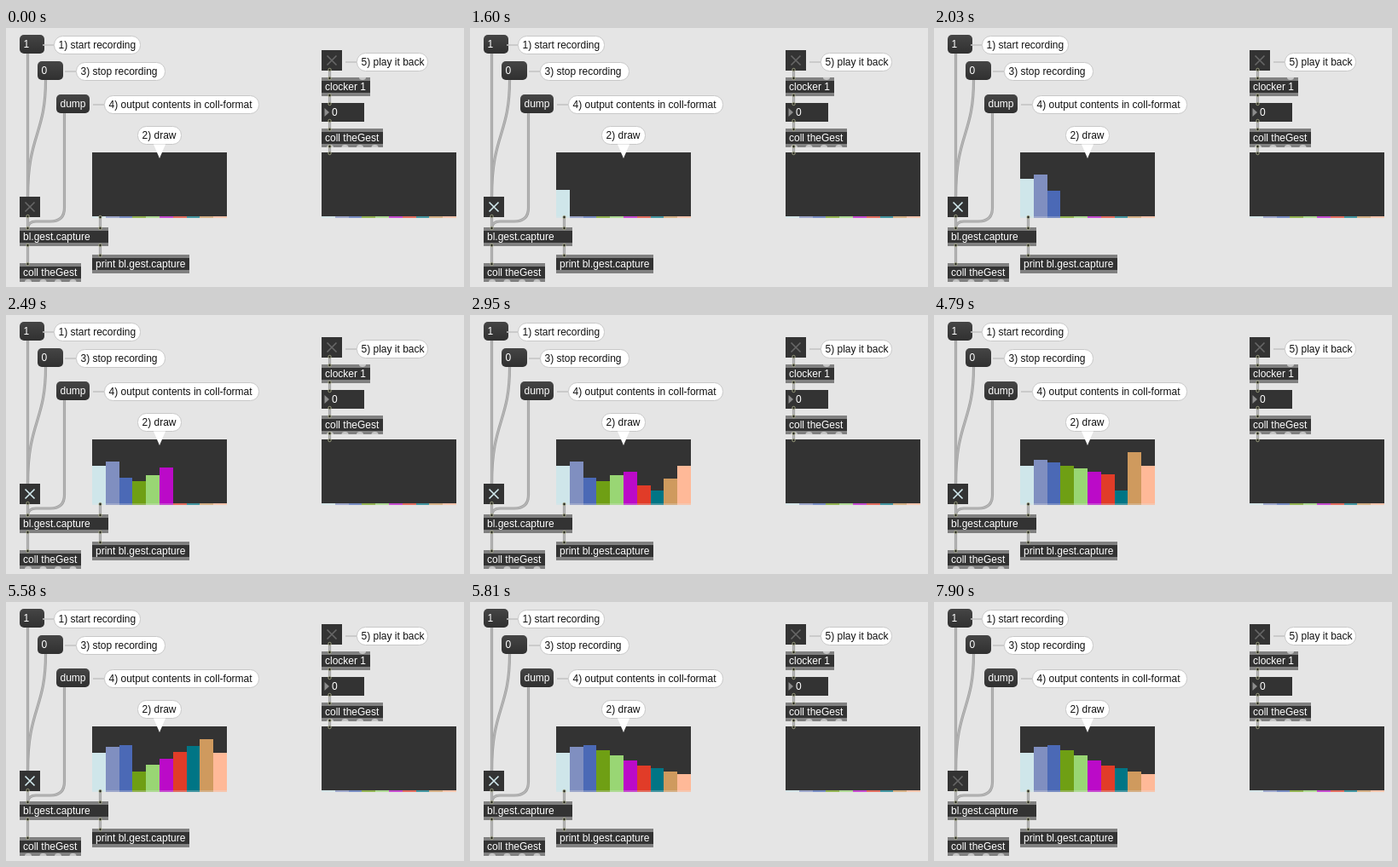
Recreate the animation shown at these times as an HTML page. Size 537x304 px, loop 8 s.

```html
<!DOCTYPE html>
<html lang="en">
<head>
<meta charset="utf-8">
<title>Gesture capture patch</title>
<style>
  html, body { margin: 0; width: 100%; height: 100%; overflow: hidden; background: #e5e5e5; }
  svg { display: block; width: 537px; height: 304px; }
  text { font: 12px Arial, "Liberation Sans", sans-serif; white-space: pre; }
</style>
</head>
<body>
<svg id="stage" viewBox="0 0 537 304" xmlns="http://www.w3.org/2000/svg">
  <defs>
    <linearGradient id="button" x2="0" y2="1">
      <stop stop-color="#454545"/><stop offset="1" stop-color="#303030"/>
    </linearGradient>
  </defs>
</svg>
<script>
const LOOP = 8000;
const DARK = '#333', LIGHT = '#fff', NOTCH = '#c6c6c6';
const FLOOR = 221, BAR_WIDTH = 15.8;
const barColors = ['#cfe6ea', '#808fc0', '#4b69b6', '#6f9f14', '#99d674',
  '#bb0ac8', '#e13c28', '#007585', '#cf9a5e', '#ffb998'];
const stage = document.getElementById('stage');

function add(tag, attrs, content) {
  const node = document.createElementNS('http://www.w3.org/2000/svg', tag);
  for (const key in attrs) node.setAttribute(key, attrs[key]);
  if (content !== undefined) node.textContent = content;
  return stage.appendChild(node);
}

const rect = (x, y, width, height, fill, rx = 0) => add('rect', { x, y, width, height, fill, rx });
const label = (x, y, content, fill = LIGHT) => add('text', { x, y, fill }, content);

function cord(d) {
  add('path', { d, fill: 'none', stroke: '#a0a0a0', 'stroke-width': 3.2 });
  add('path', { d, fill: 'none', stroke: '#b6b6b6', 'stroke-width': 1.6 });
}

const ports = [];
function wire(x, top, bottom) {
  cord(`M${x} ${top}V${bottom}`);
  ports.push([x, top - 1], [x, bottom + 1]);
}

function button(x, y, width, content) {
  rect(x, y, width, 22, 'url(#button)', 5);
  return label(x + 4.5, y + 15, content);
}

function bubble(x, y, width, content) {
  add('rect', { x: x + .5, y: y + .5, width: width - 1, height: 21, rx: 10, fill: '#fff', stroke: '#c8c8c8' });
  label(x + 5.5, y + 15, content, '#111');
}

function sideComment(x, y, width, content) {
  add('path', { d: `M${x - 13} ${y + 11}H${x}`, stroke: '#c4c4c4', 'stroke-width': 1.6 });
  bubble(x, y, width, content);
}

function object(x, y, width, content, outlets = 0) {
  rect(x, y, width, 22, '#808080');
  rect(x, y + 4, width, 14, DARK);
  label(x + 4, y + 15, content);
  for (let i = 0; i < outlets; i++) {
    add('path', { d: `M${x + 6 + i * 17.5} ${y + 22}a4 3 0 0 1 8 0z`, fill: NOTCH });
  }
}

function toggle(x, y) {
  rect(x, y, 24, 24, DARK);
  return add('path', {
    d: `M${x + 6.5} ${y + 6.5}l11 11m0 -11l-11 11`, stroke: '#666', 'stroke-width': 1.7, fill: 'none'
  });
}

function slider(x) {
  rect(x, 146, 158, 75, DARK);
  return barColors.map((color, i) => {
    const left = Math.round(i * BAR_WIDTH);
    const width = Math.round((i + 1) * BAR_WIDTH) - left;
    rect(x + left, FLOOR, width, 2, color).setAttribute('opacity', .7);
    return rect(x + left, FLOOR, width, 0, color);
  });
}

cord('M46.500 61C46.500 125 25.500 125 25.500 198');
cord('M25.500 30V198');
cord('M68.500 100V211Q68.500 227 52 227H35Q26 227 25.500 235');
wire(25.5, 222, 234);
wire(25.5, 256, 276);
wire(110.5, 223, 234);
wire(110.5, 256, 266);
wire(379.5, 50, 58);
wire(379.5, 80, 88);
wire(379.5, 110, 118);
wire(379.5, 140, 146);

const startButton = button(16, 8, 29, '1');
const stopButton = button(37, 39, 30, '0');
const dumpButton = button(59, 78, 39, 'dump');

sideComment(56, 9, 102, '1) start recording');
sideComment(82, 40, 105, '3) stop recording');
sideComment(115, 79, 182, '4) output contents in coll-format');
sideComment(411, 29, 84, '5) play it back');

const recordMark = toggle(16, 198);
toggle(370, 26);

object(16, 234, 104, 'bl.gest.capture');
object(101, 266, 114, 'print bl.gest.capture');
object(16, 276, 72, 'coll theGest', 4);
object(370, 58, 57, 'clocker 1');
object(370, 118, 72, 'coll theGest', 4);
add('path', { d: 'M414 58a4 3 0 0 0 8 0z', fill: NOTCH });

rect(370, 88, 50, 22, DARK);
add('path', { d: 'M373.500 94L379 99L373.500 104z', fill: '#8c8c8c' });
label(382, 103, '0');

const bars = slider(101);
slider(370);
for (const [cx, cy] of ports) {
  add('circle', { cx, cy, r: 1.7, fill: '#222', stroke: '#b9bd96', 'stroke-width': .8 });
}

bubble(154, 115, 52, '2) draw');
add('path', { d: 'M173 136.500L180 153L187 136.500z', fill: '#fff' });

// Pointer drags across the slider, as turning points [bar, height].
const drags = [
  { from: 1600, to: 2390, steps: 17, turns: [[0, 190], [0, 177], [1, 172], [2, 191], [3, 195], [5, 181]] },
  { from: 2490, to: 2950, steps: 11, turns: [[5, 179], [5, 184], [6, 200], [7, 206], [9, 177]] },
  { from: 4000, to: 4200, steps: 5, turns: [[1, 170], [6, 187]] },
  { from: 4790, to: 5020, steps: 6, turns: [[8, 161], [2, 206]] },
  { from: 5580, to: 5810, steps: 6, turns: [[2, 168], [6, 192], [9, 202]] }
];

const mix = (a, b, f) => a + (b - a) * f;

// One stop for every bar that lies on the way between turning points.
function stopsAlong(turns) {
  const stops = [turns[0]];
  for (let i = 1; i < turns.length; i++) {
    const [x0, y0] = turns[i - 1], [x1, y1] = turns[i];
    const count = Math.max(1, Math.abs(x1 - x0));
    for (let n = 1; n <= count; n++) stops.push([mix(x0, x1, n / count), mix(y0, y1, n / count)]);
  }
  return stops;
}
for (const drag of drags) drag.stops = stopsAlong(drag.turns);

function applyDrag(tops, { from, to, steps, stops }, t) {
  if (t < from) return;
  const last = steps - 1;
  const step = Math.min(last, Math.floor((t - from) / (to - from) * last + 1e-6));
  const reach = step / last * (stops.length - 1);
  stops.forEach(([bar, y], i) => {
    if (i <= reach) tops[bar] = y;
    else if (i - 1 < reach) tops[bar] = mix(stops[i - 1][1], y, reach - i + 1);
  });
}

const between = (t, from, to) => t >= from && t < to;
const press = (node, down) => node.setAttribute('fill', down ? '#a6a6a6' : LIGHT);

function render(t) {
  const tops = bars.map(() => FLOOR);
  for (const drag of drags) applyDrag(tops, drag, t);
  bars.forEach((bar, i) => {
    const top = Math.round(tops[i]);
    bar.setAttribute('y', top);
    bar.setAttribute('height', FLOOR - top);
  });
  recordMark.setAttribute('stroke', between(t, 500, 7160) ? '#cfe6ea' : '#666');
  press(startButton, between(t, 500, 580));
  press(stopButton, between(t, 7160, 7290));
  press(dumpButton, between(t, 7800, 7900));
}

const began = performance.now();
function frame() {
  render((performance.now() - began) % LOOP);
  requestAnimationFrame(frame);
}
frame();
</script>
</body>
</html>
```
